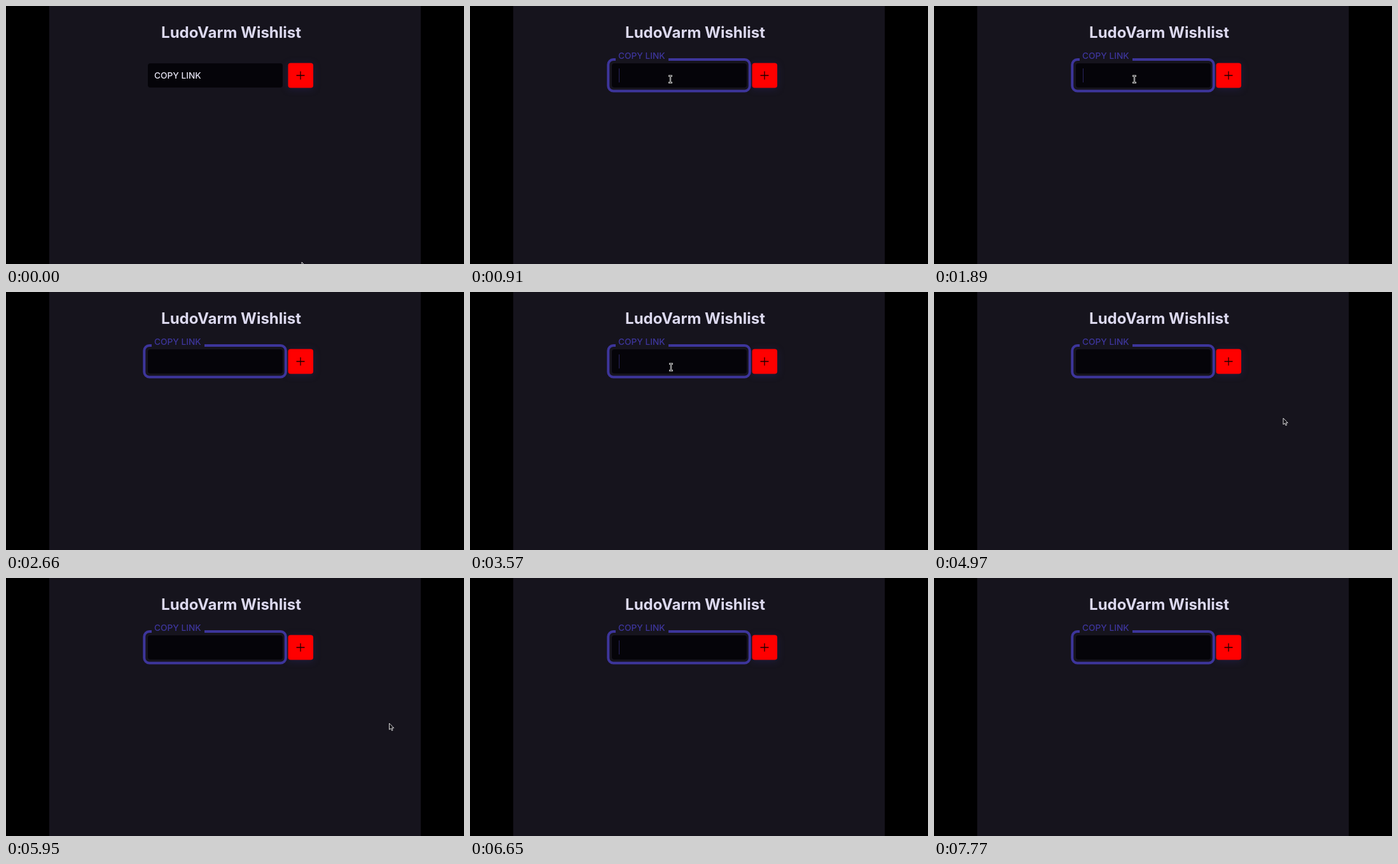
Animation, 720 px wide and 405 px high, one loop 8 s. Source, as an HTML page:

```html
<!DOCTYPE html>
<html lang="en">
<head>
<meta charset="utf-8">
<title>Wishlist</title>
<style>
  html, body { margin: 0; width: 100%; height: 100%; overflow: hidden; background: #000; }
  svg { display: block; width: 100vw; height: 100vh; }
  text { font-family: Inter, Roboto, sans-serif; }
  .title { font-size: 24px; font-weight: 700; fill: #dcd9ef; }
  .label { font-size: 13.7px; font-weight: 500; }
  .button { fill: #f00; filter: drop-shadow(0 2px 6px rgba(50, 46, 135, .3)); }
</style>
</head>
<body>
<svg viewBox="0 0 720 405">
  <defs>
    <clipPath id="pane"><rect x="68" width="584" height="405"/></clipPath>
  </defs>
  <rect width="720" height="405" fill="#000"/>
  <rect x="68" width="584" height="405" fill="#16141d"/>
  <text class="title" x="464" y="50" text-anchor="end">LudoVarm Wishlist</text>

  <rect class="button" x="443.5" y="89.5" width="39.5" height="39" rx="4"/>
  <path d="M456.5 109H469.5M463 102.5V115.5" stroke="#200000" stroke-width="1.3"/>

  <rect x="223" y="90" width="212" height="38" rx="4" fill="#050409"/>
  <g id="focus">
    <rect x="217.3" y="84" width="222.5" height="49.5" rx="8" fill="none" stroke="#3d359b" stroke-width="4"/>
    <rect x="229" y="80" width="83" height="8" fill="#16141d"/>
  </g>
  <text class="label" id="label" x="233" y="114">COPY LINK</text>
  <path id="caret" d="M234.5 98V120" stroke="#2a2562"/>

  <g clip-path="url(#pane)">
    <path id="arrow" d="M0 0V10L2.3 8L4 11.5L5.6 10.8L4.1 7.4H7.2Z"
          fill="#111016" stroke="#eee" stroke-width=".9" stroke-linejoin="round"/>
    <g id="beam" fill="none">
      <path d="M-3 -5.2H3M0 -5V5M-3 5.2H3" stroke="#e8e8e8" stroke-width="2.4"/>
      <path d="M-2.4 -5.2H2.4M0 -5V5M-2.4 5.2H2.4" stroke="#111" stroke-width=".8"/>
    </g>
  </g>
</svg>
<script>
const LOOP = 8000, TICK = 70, BLINK = 500;
const FIRST_CLICK = 840, SECOND_CLICK = 3220;
const [focus, label, caret, arrow, beam] =
  ["focus", "label", "caret", "arrow", "beam"].map(id => document.getElementById(id));

const pointerStart = { x: 465, y: 402 };
const moves = [
  { from: 280, to: 700, x: 315, y: 115 },
  { from: SECOND_CLICK, to: 3500, x: 316, y: 118 },
  { from: 4340, to: 4970, x: 549, y: 198 },
  { from: 5110, to: 5880, x: 602.5, y: 228 },
  { from: 6090, to: 6650, x: 657, y: 230 }
];

const mix = (a, b, k) => a + (b - a) * k;
const progress = (t, from, to) => {
  const k = Math.min(1, Math.max(0, (t - from) / (to - from)));
  return k * k * (3 - 2 * k);
};
const show = (el, on) => el.setAttribute("visibility", on ? "visible" : "hidden");

function pointerAt(t) {
  return moves.reduce((p, m) => {
    const k = progress(t, m.from, m.to);
    return { x: mix(p.x, m.x, k), y: mix(p.y, m.y, k) };
  }, pointerStart);
}

function drawField(t) {
  const k = progress(t, FIRST_CLICK - TICK, FIRST_CLICK + TICK);
  focus.setAttribute("opacity", k);
  label.setAttribute("y", mix(114, 83, k));
  label.style.fill = `color-mix(in srgb, #3d359b ${k * 100}%, #e8e6f5)`;

  // each click restarts the blink
  const sinceClick = t - (t < SECOND_CLICK ? FIRST_CLICK : SECOND_CLICK);
  show(caret, sinceClick >= 0 && sinceClick % (2 * BLINK) < BLINK);
}

function drawPointer(t) {
  const { x, y } = pointerAt(t);
  const overField = x > 223 && x < 435 && y > 90 && y < 128;
  const idle = t >= 2520 && t < SECOND_CLICK;
  for (const el of [arrow, beam]) el.setAttribute("transform", `translate(${x} ${y})`);
  show(arrow, !idle && !overField);
  show(beam, !idle && overField);
}

const start = performance.now();
function frame() {
  const elapsed = (performance.now() - start) % LOOP;
  const t = Math.floor(elapsed / TICK) * TICK;
  drawField(t);
  drawPointer(t);
  requestAnimationFrame(frame);
}
frame();
</script>
</body>
</html>
```
